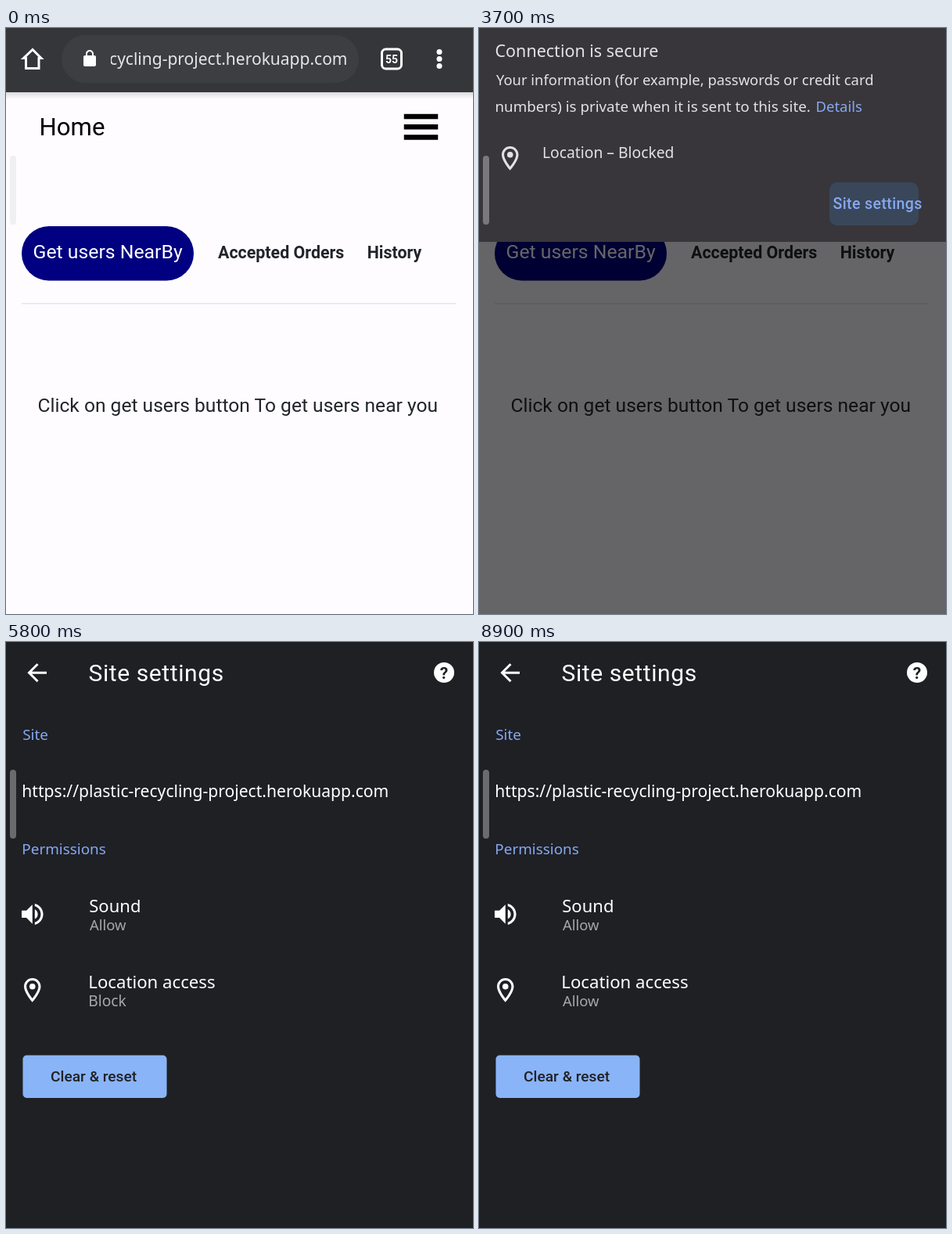
An HTML page for the animation above (9 s loop, 597x748 px).

```html
<!DOCTYPE html>
<html lang="en">
<head>
<meta charset="utf-8">
<title>Site settings</title>
<style>
html, body { margin: 0; width: 100%; height: 100%; overflow: hidden; background: #1f2024; }
svg { display: block; }
text { font-family: "Noto Sans", "Open Sans", sans-serif; white-space: pre; }
.web text, .ui { font-family: Roboto, sans-serif; }
.bold { font-weight: 700; }
.med { font-weight: 500; }
.link { fill: #86a8f1; }
.sub { fill: #a6a7ab; }
</style>
</head>
<body>
<svg width="597" height="748" viewBox="0 0 597 748">
  <defs>
    <linearGradient id="shade" x2="0" y2="1">
      <stop stop-color="#000" stop-opacity=".14"/>
      <stop offset="1" stop-color="#000" stop-opacity="0"/>
    </linearGradient>
    <clipPath id="urlClip"><rect x="134" y="10" width="310" height="60"/></clipPath>
    <g id="pin">
      <path d="M12 2C8.13 2 5 5.13 5 9c0 5.25 7 13 7 13s7-7.75 7-13c0-3.87-3.13-7-7-7zM7 9c0-2.76 2.24-5 5-5s5 2.24 5 5c0 2.88-2.88 7.19-5 9.88C9.92 16.21 7 11.85 7 9z"/>
      <circle cx="12" cy="9" r="2.5"/>
    </g>
  </defs>

  <g id="home">
    <rect width="597" height="748" fill="#fefcff"/>
    <rect y="82" width="597" height="9" fill="url(#shade)"/>
    <rect width="597" height="82" fill="#35363a"/>
    <rect x="71" y="9" width="380" height="61" rx="30.5" fill="#3d3e42"/>
    <path d="M34 27.5L22.5 38.5H25.5V51.5H42V38.5H45Z" fill="none" stroke="#fff" stroke-width="3"/>
    <path transform="translate(95 27)" fill="#fff" d="M18 8h-1V6c0-2.76-2.24-5-5-5S7 3.24 7 6v2H6c-1.1 0-2 .9-2 2v10c0 1.1.9 2 2 2h12c1.1 0 2-.9 2-2V10c0-1.1-.9-2-2-2zM15.1 8H8.9V6c0-1.71 1.39-3.1 3.1-3.1s3.1 1.39 3.1 3.1v2z"/>
    <g clip-path="url(#urlClip)">
      <text x="436.5" y="47" font-size="21" text-anchor="end" fill="#e6e6e8">plastic-recycling-project.herokuapp.com</text>
    </g>
    <rect x="480.5" y="27" width="25" height="25" rx="5" fill="none" stroke="#fff" stroke-width="3"/>
    <text class="ui bold" x="493" y="44.5" font-size="14" text-anchor="middle" fill="#fff">55</text>
    <g fill="#fff"><circle cx="554" cy="30.5" r="3.5"/><circle cx="554" cy="39.5" r="3.5"/><circle cx="554" cy="48.5" r="3.5"/></g>
    <g class="web" fill="#212529">
      <text x="42.5" y="137" font-size="31.2" fill="#000">Home</text>
      <path d="M512 113H549M512 126.3H549M512 139.5H549" stroke="#000" stroke-width="6.5" stroke-linecap="square" stroke-linejoin="round"/>
      <rect x="20" y="253" width="220" height="69.5" rx="34.7" fill="#000080"/>
      <text x="34.5" y="294" font-size="24.8" fill="#fff">Get users NearBy</text>
      <text class="bold" x="271" y="294" font-size="21.4">Accepted Orders</text>
      <text class="bold" x="461.7" y="294" font-size="21.4">History</text>
      <rect x="20" y="351" width="555" height="1.5" fill="#e6e5e9"/>
      <text x="40.5" y="490" font-size="24.6">Click on get users button To get users near you</text>
    </g>
  </g>
  <rect id="shadeHome" width="597" height="748"/>

  <g id="panel">
    <rect width="597" height="273" fill="#38363b"/>
    <g id="info" fill="#e2e2e4">
      <text x="20.5" y="37" font-size="21.5">Connection is secure</text>
      <text x="22" y="73" font-size="18.4">Your information (for example, passwords or credit card</text>
      <text x="20.5" y="107" font-size="18.8">numbers) is private when it is sent to this site.</text>
      <text class="link" x="430.5" y="107" font-size="18.5">Details</text>
      <use href="#pin" transform="translate(21.4 148) scale(1.53)"/>
      <text x="81" y="165.5" font-size="19.3">Location – Blocked</text>
      <rect id="press" x="448" y="197" width="114" height="55" rx="10" fill="#3a475a"/>
      <text class="ui med link" x="452.5" y="231" font-size="19.5" letter-spacing=".4">Site settings</text>
    </g>
  </g>

  <g id="settings" fill="#fff">
    <rect x="-2" width="600" height="748" fill="#1f2024"/>
    <path d="M52 39.3H30M40.5 28.3L29.5 39.3L40.5 50.3" fill="none" stroke="#fff" stroke-width="3"/>
    <text class="ui" x="105.5" y="49.5" font-size="30" letter-spacing=".6">Site settings</text>
    <circle cx="560" cy="39" r="13"/>
    <text class="ui bold" x="560" y="46.5" font-size="21" text-anchor="middle" fill="#1f2024">?</text>
    <text class="link" x="21.2" y="124.5" font-size="18.9">Site</text>
    <text x="20.3" y="198" font-size="21.1">https://plastic-recycling-project.herokuapp.com</text>
    <text class="link" x="20.3" y="270.5" font-size="18.9">Permissions</text>
    <path transform="translate(15.4 329.1) scale(1.53)" d="M3 9v6h4l5 5V4L7 9H3zm13.5 3c0-1.77-1.02-3.29-2.5-4.03v8.05c1.48-.73 2.5-2.25 2.5-4.02zM14 3.23v2.06c2.89.86 5 3.54 5 6.71s-2.11 5.85-5 6.71v2.06c4.01-.91 7-4.49 7-8.77s-2.99-7.86-7-8.77z"/>
    <text x="106.3" y="344.5" font-size="22">Sound</text>
    <text class="sub" x="107" y="368" font-size="18.4">Allow</text>
    <use href="#pin" transform="translate(15.4 426) scale(1.53)"/>
    <text x="105.3" y="441.5" font-size="22.2">Location access</text>
    <text id="access" class="sub" y="465"></text>
    <rect x="21.5" y="527.5" width="184" height="54.5" rx="5" fill="#8ab4f8"/>
    <text class="ui med" x="57" y="561" font-size="19.2" fill="#202124">Clear &amp; reset</text>
  </g>

  <rect id="shadeSettings" width="597" height="748"/>
  <g id="dialog" fill="#fff">
    <rect x="21.5" y="461" width="551.5" height="254" rx="8" fill="#38373c"/>
    <g fill="none" stroke-width="3">
      <circle id="ringAllow" cx="76.5" cy="510" r="13.8"/>
      <circle id="ringBlock" cx="76.5" cy="583" r="13.8"/>
    </g>
    <circle id="dot" cx="76.5" r="8" fill="#8ab4f8"/>
    <text x="132" y="518" font-size="23.6">Allow</text>
    <text x="130" y="591.5" font-size="24.8">Block</text>
    <text class="ui med" x="475" y="674" font-size="19.1" fill="#8ab4f8">Cancel</text>
  </g>

  <rect x="5" y="163" width="8" height="88" rx="4" fill="#dbdbdb" fill-opacity=".4"/>
</svg>
<script>
const LOOP = 9000;
const $ = id => document.getElementById(id);
const ramp = (t, start, length) => Math.min(1, Math.max(0, (t - start) / length));
const easeOut = (p, power) => 1 - (1 - p) ** power;
const fade = (id, value) => $(id).setAttribute("opacity", value);
const move = (id, x, y) => $(id).setAttribute("transform", `translate(${x} ${y})`);

function draw(t) {
  // connection panel drops in, then leaves
  const opening = ramp(t, 2150, 220), closing = ramp(t, 3850, 200);
  move("panel", 0, -273 * (1 - easeOut(opening, 1.46) * (1 - closing ** 2)));
  fade("info", ramp(t, 2400, 200));
  fade("press", ramp(t, 3580, 110));

  // settings page pushes the home page aside
  const slide = easeOut(ramp(t, 4150, 500), 3);
  move("home", -149 * slide, 0);
  move("settings", 600 * (1 - slide), 0);
  fade("shadeHome", Math.max(0.6 * opening * (1 - closing), 0.5 * slide));

  // permission dialog
  const shown = ramp(t, 6500, 200) * (1 - ramp(t, 7800, 160));
  fade("shadeSettings", 0.6 * shown);
  fade("dialog", shown);
  const allowed = t >= 7700;
  $("dot").setAttribute("cy", allowed ? 510 : 583);
  $("ringAllow").setAttribute("stroke", allowed ? "#8ab4f8" : "#a0a0a4");
  $("ringBlock").setAttribute("stroke", allowed ? "#a0a0a4" : "#8ab4f8");
  const saved = t >= 7800, access = $("access");
  access.textContent = saved ? "Allow" : "Block";
  access.setAttribute("x", saved ? 107 : 105.3);
  access.setAttribute("font-size", saved ? 18.4 : 19.2);
}

const began = performance.now();
function tick() {
  draw((performance.now() - began) % LOOP);
  requestAnimationFrame(tick);
}
tick();
</script>
</body>
</html>
```
